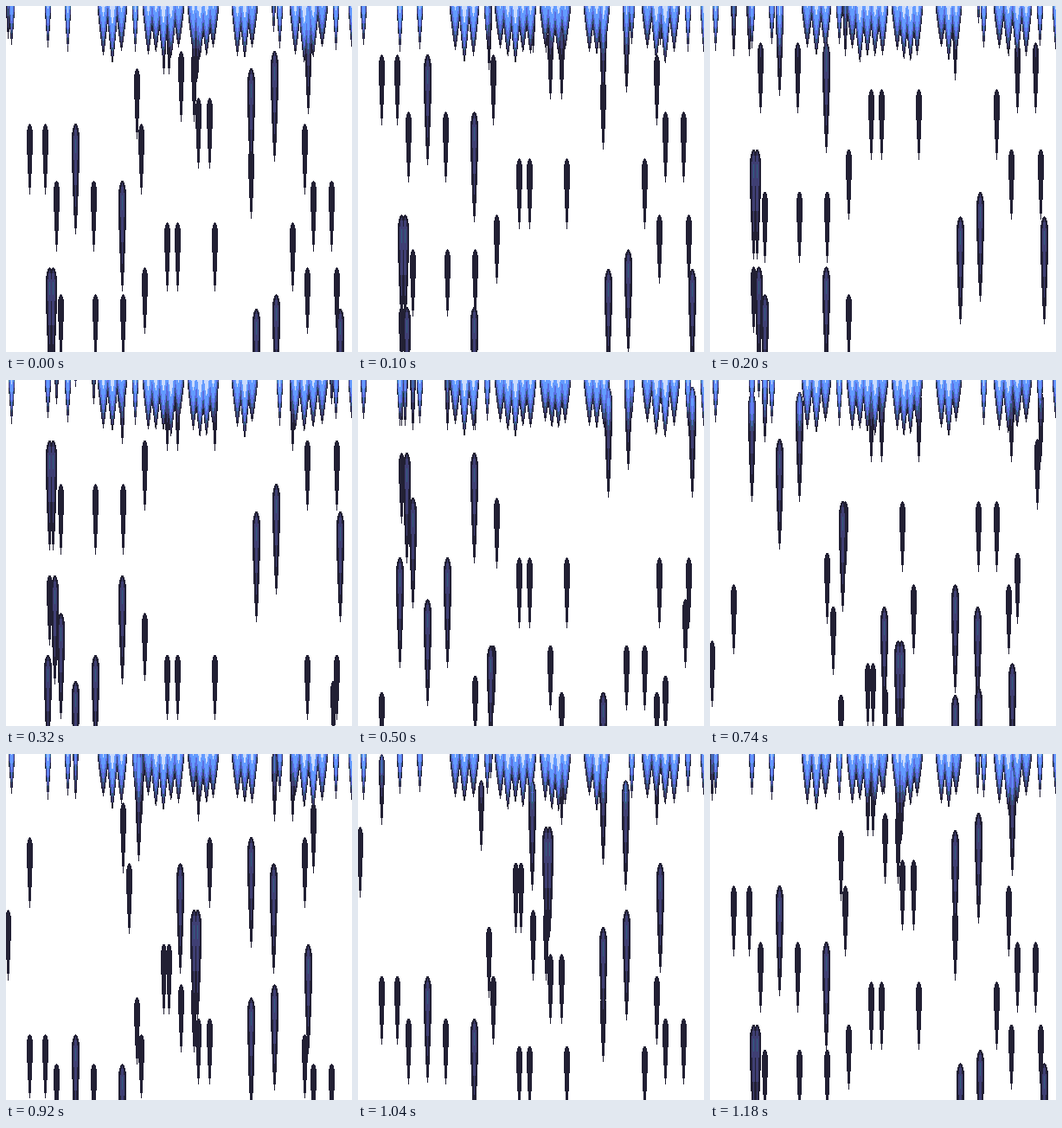
Recreate the animation shown at these times as an HTML page with a canvas. Size 400 by 400 pixels, loop 1.2 s.

```html
<!DOCTYPE html>
<html>
<head>
<meta charset="utf-8">
<style>
  html, body { margin: 0; width: 100%; height: 100%; overflow: hidden; background: #fff; }
  canvas { display: block; width: 100%; height: 100%; image-rendering: pixelated; }
</style>
</head>
<body>
<canvas id="stage" width="400" height="400"></canvas>
<script>
const SIZE = 400, LOOP = 1200, STEP = 20;
const ctx = document.getElementById('stage').getContext('2d');
const image = ctx.createImageData(SIZE, SIZE);
const pixels = new Uint32Array(image.data.buffer);
const heat = new Float32Array(SIZE * SIZE);

// Heat thresholds and their colours, hottest first
const bands = [
  [6.5, 'cbdbfc'], [4, '639bff'], [2.5, '5b6ee1'],
  [1.9, '306082'], [1, '3f3f74'], [0, '222034']
].map(([min, hex]) => {
  const [r, g, b] = hex.match(/../g).map(h => parseInt(h, 16));
  return [min, (255 << 24 | b << 16 | g << 8 | r) >>> 0];
});

// Bursts of drops: start time in ms, columns of thin drops, columns of thick ones
const thin = { len: 82, half: 3.7, power: 0.95 };
const thick = { len: 128, half: 5, power: 2 };
const drops = [
  [-8, [186, 198, 241, 348, 382], [48, 103]],
  [60, [378], [80]],
  [150, [156, 222, 331, 310], [153]],
  [225, [135, 355], []],
  [275, [27, 235, 345], [283]],
  [313, [142], [201, 309]],
  [380, [2], [217, 221]],
  [432, [182, 188], [349]],
  [500, [202, 217], [310]],
  [525, [151], [283]],
  [568, [222, 235], []],
  [605, [27, 45, 156, 345], [80]],
  [640, [283], []],
  [688, [58, 101, 355, 376], [134]],
  [755, [186, 198, 241, 331], []],
  [842, [160, 348, 382], [50, 54]],
  [905, [63, 103, 135], [312]],
  [945, [], [289, 386]],
  [1040, [50], [56, 134]],
  [1105, [160], [63]]
].flatMap(([start, thins, thicks]) => [
  ...thins.map(x => ({ x, start, ...thin })),
  ...thicks.map(x => ({ x, start, ...thick }))
]);

// Hanging fringe: lone spikes, then clusters of evenly spaced ones
const spikes = [6, 48, 71, 149, 316, 381, 399].map(x => ({ x, len: 48, half: 4 }));
for (const [left, right] of [[112, 133], [164, 199], [216, 239], [267, 284], [334, 365]]) {
  const gaps = Math.round((right - left) / 9);
  for (let i = 0; i <= gaps; i++) {
    const x = left + (right - left) * i / gaps;
    spikes.push({ x, len: 52 + 10 * Math.sin(Math.PI * i / gaps), half: 7 });
  }
}

// Accelerates from the bottom, then rises at constant speed
const topAt = age => age < 533 ? 398 - 0.00075 * age * age : 185 - 0.8 * (age - 533);

// Width of a drop from its round head (0) to its pointed tail (1)
const profile = v => v < 0.2
  ? Math.sqrt(1 - (1 - v / 0.2) ** 2)
  : ((1 - v) / 0.8) ** 0.6;

function paint(x, top, len, half, heatAt) {
  const bottom = Math.min(SIZE, top + len), right = Math.min(SIZE - 1, x + half);
  for (let y = Math.max(0, Math.ceil(top)); y < bottom; y++)
    for (let px = Math.max(0, Math.ceil(x - half)); px <= right; px++) {
      const i = y * SIZE + px;
      heat[i] = Math.max(heat[i], heatAt(Math.abs(px - x) / half, y));
    }
}

function paintSpike({ x, len, half }, t) {
  const depth = len * (1 + 0.1 * Math.sin(6 * Math.PI * t / LOOP + x * 1.7));
  paint(x, 0, depth, half, (side, y) => (depth * (1 - side ** 1.3) - y) / 7);
}

function paintDrop({ x, start, len, half, power }, t) {
  const age = (t - start + LOOP) % LOOP, top = topAt(age);
  if (top > 364) return;
  const length = len * (0.75 + 0.25 * Math.min(1, age / 500));
  paint(x, top, length, half, (side, y) =>
    power * (1 + 3 * Math.max(0, 1 - y / 60)) * (profile((y - top) / length) - side));
}

function render(t) {
  heat.fill(0);
  for (const spike of spikes) paintSpike(spike, t);
  for (const drop of drops) paintDrop(drop, t);
  for (let i = 0; i < heat.length; i++) {
    const band = bands.find(([min]) => heat[i] > min);
    pixels[i] = band ? band[1] : 0xffffffff;
  }
  ctx.putImageData(image, 0, 0);
}

let shown = -1;
function frame() {
  const t = Math.floor(performance.now() % LOOP / STEP) * STEP;
  if (t !== shown) render(shown = t);
  requestAnimationFrame(frame);
}
frame();
</script>
</body>
</html>
```
